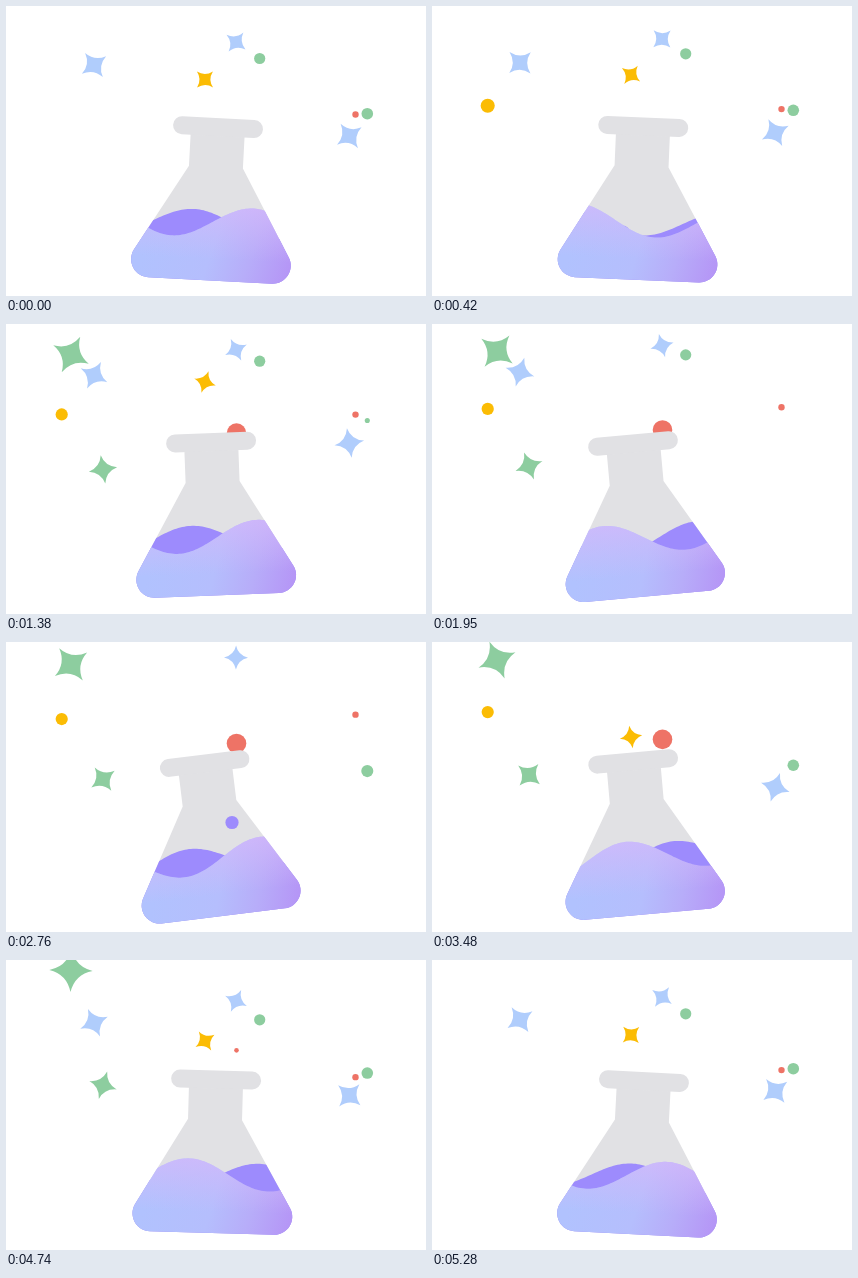
Animation of 420x290 px, one loop 5310 ms. Source, as an HTML page with a canvas:

```html
<!DOCTYPE html>
<html lang="en">
<head>
<meta charset="utf-8">
<title>Bubbling flask</title>
<style>
  html, body { margin: 0; width: 100%; height: 100%; overflow: hidden; background: #fff; }
  canvas { display: block; width: 420px; height: 290px; }
</style>
</head>
<body>
<canvas id="stage"></canvas>
<script>
const LOOP = 5310;    // visible part of the cycle
const CYCLE = 5400;   // period the motion is built on
const STEP = 30;
const LIFE = 4250;
const POP = 240;
const SPIN = 19;      // degrees per second
const TAU = Math.PI * 2;

const BLUE = '#b0cdfc', GREEN = '#8dcd9f', YELLOW = '#fbbc04';
const RED = '#ee7366', VIOLET = '#9d8bfd', GLASS = '#e1e1e4';

// y is the height at birth, v the rise in px per second
const particles = [
  { color: BLUE,   x: 88,    y: 68.8,  r: 15,  born: 3650, v: 5.6,  angle: 87, spin: -1 },
  { color: BLUE,   x: 230,   y: 43.8,  r: 12,  born: 4350, v: 7.4,  angle: 18, spin: 1 },
  { color: BLUE,   x: 343.3, y: 148.4, r: 15,  born: 3100, v: 8,    angle: 11, spin: 1 },
  { color: YELLOW, x: 199,   y: 100.4, r: 11.3, born: 3000, v: 11.2, angle: 90, spin: -1 },
  { color: GREEN,  x: 65,    y: 35.5,  r: 20,  born: 560,  v: 6,    angle: 12, spin: 1 },
  { color: GREEN,  x: 97,    y: 148,   r: 14.3, born: 950,  v: 6,    angle: 89, spin: -1 },
  { color: GREEN,  x: 253.7, y: 70.8,  r: 5.6, born: 3750, v: 11.1 },
  { color: GREEN,  x: 361.3, y: 130.8, r: 5.8, born: 2550, v: 8.1 },
  { color: YELLOW, x: 55.7,  y: 101.4, r: 6.1, born: 250,  v: 9.7 },
  { color: RED,    x: 349.5, y: 122.2, r: 3.2, born: 4350, v: 13 },
  { color: RED,    x: 230.5, y: 114.1, r: 9.8, born: 500,  v: 5.6 }
];

const bubbles = [
  { x: 190.5, r: 7.6, born: 380 },
  { x: 226,   r: 6.6, born: 2100 },
  { x: 190.5, r: 7.8, born: 3550 }
];

const starPath = new Path2D('M0-1Q.18-.18 1 0Q.18.18 0 1Q-.18.18-1 0Q-.18-.18 0-1Z');
const body = new Path2D('M181 120V158L130.4 244.7A18 18 0 0 0 146 271.5H270' +
  'A18 18 0 0 0 285.6 244.7L235 158V120Z');
const lip = new Path2D('M172 109H244A9 9 0 0 1 244 127H172A9 9 0 0 1 172 109Z');

const canvas = document.getElementById('stage');
const ctx = canvas.getContext('2d');
const ratio = window.devicePixelRatio || 1;
canvas.width = 420 * ratio;
canvas.height = 290 * ratio;

function gradient(x0, y0, x1, y1, stops) {
  const g = ctx.createLinearGradient(x0, y0, x1, y1);
  stops.forEach(([at, color]) => g.addColorStop(at, color));
  return g;
}
const liquid = gradient(145, 225, 285, 262,
  [[0, '#b1c2fe'], [0.45, '#b5befd'], [0.72, '#b7adf9'], [1, '#b596f6']]);
const sheen = gradient(0, 195, 0, 250,
  [[0, 'rgba(214,184,250,.75)'], [1, 'rgba(214,184,250,0)']]);

const ageOf = (item, t) => (t - item.born + CYCLE) % CYCLE;

// Overshooting growth from 0 to 1
function backOut(u) {
  const w = Math.min(u, 1) - 1;
  return 1 + 4 * w ** 3 + 3 * w ** 2;
}
const popScale = (age, life, span) => backOut(Math.min(age, life - age) / span);

function disc(x, y, r, color) {
  ctx.fillStyle = color;
  ctx.beginPath();
  ctx.arc(x, y, Math.max(r, 0), 0, TAU);
  ctx.fill();
}

function drawParticle(p, t) {
  const age = ageOf(p, t);
  if (age >= LIFE) return;
  const y = p.y - p.v * age / 1000;
  const r = p.r * popScale(age, LIFE, POP);
  if (!p.spin) return disc(p.x, y, r, p.color);
  ctx.save();
  ctx.translate(p.x, y);
  ctx.rotate((p.angle + p.spin * SPIN * age / 1000) * Math.PI / 180);
  ctx.scale(r, r);
  ctx.fillStyle = p.color;
  ctx.fill(starPath);
  ctx.restore();
}

function drawBubble(b, t) {
  const age = ageOf(b, t), life = 1000;
  if (age >= life) return;
  disc(b.x, 230 - 0.075 * age, b.r * Math.min(1, (life - age) / 150), VIOLET);
}

function wave(peak, mean, height) {
  const path = new Path2D();
  path.moveTo(110, 290);
  for (let x = 110; x <= 306; x += 2) {
    path.lineTo(x, mean - height * Math.cos((x - peak) / 160 * TAU));
  }
  path.lineTo(306, 290);
  path.closePath();
  return path;
}

function enterFlask(t) {
  const phase = t / CYCLE * TAU;
  ctx.translate(208, 195 + 1.5 * (1 + Math.cos(2 * phase)));
  ctx.rotate((-2 + 5 * Math.cos(phase)) * Math.PI / 180);
  ctx.translate(-208, -195);
}

function drawFlask(t) {
  const p = t / (CYCLE / 4);
  const shift = 160 * (p - 0.01 - 0.045 * Math.cos(TAU * (p - 0.05)));

  ctx.save();
  enterFlask(t);
  ctx.fillStyle = GLASS;
  ctx.fill(body);
  ctx.fill(lip);
  ctx.restore();

  bubbles.forEach(b => drawBubble(b, t));

  ctx.save();
  enterFlask(t);
  ctx.clip(body);
  ctx.fillStyle = VIOLET;
  ctx.fill(wave(180 - shift, 214, 13));
  const front = wave(256 + shift, 213, 15.5);
  ctx.fillStyle = liquid;
  ctx.fill(front);
  ctx.fillStyle = sheen;
  ctx.fill(front);
  ctx.restore();
}

function draw(t) {
  ctx.setTransform(ratio, 0, 0, ratio, 0, 0);
  ctx.fillStyle = '#fff';
  ctx.fillRect(0, 0, 420, 290);
  particles.forEach(p => drawParticle(p, t));
  drawFlask(t);
}

const start = performance.now();
function tick() {
  const t = (performance.now() - start) % LOOP;
  draw(Math.floor(t / STEP) * STEP);
  requestAnimationFrame(tick);
}
tick();
</script>
</body>
</html>
```
